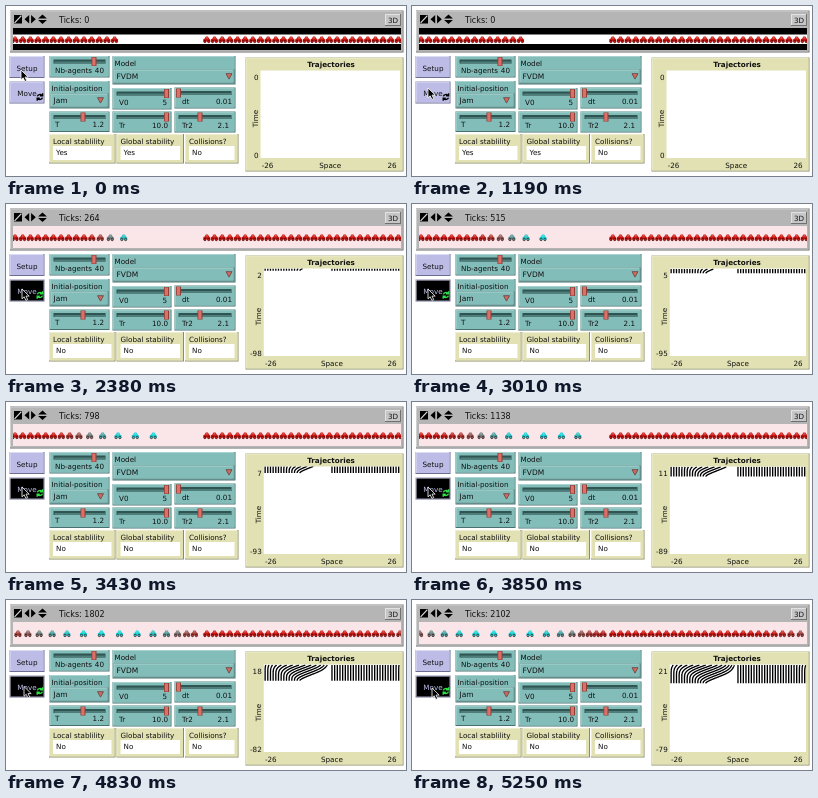
An HTML page for the animation above (5320 ms loop, 400 by 170 pixels).

```html
<!DOCTYPE html>
<html lang="en">
<head>
<meta charset="utf-8">
<title>Traffic jam model</title>
<style>
html, body { margin: 0; width: 100%; height: 100%; overflow: hidden; background: #fff; }
svg { display: block; width: 400px; height: 170px; font: 7.2px "DejaVu Sans", sans-serif; }
</style>
</head>
<body>
<svg id="stage" viewBox="0 0 400 170">
  <defs>
    <clipPath id="viewClip"><rect x="7" y="22" width="388" height="22"/></clipPath>
    <clipPath id="plotClip"><rect x="250" y="64.5" width="144" height="87.5"/></clipPath>
  </defs>
</svg>
<script>
const LOOP = 5320, STEP = 70;
const LEFT = 5, WIDTH = 391, PATCH = WIDTH / 53;
const CARS = 40, SPACING = 7.66;
const PRESS = 1680, RUN = 1750, FIRST_UPDATE = 2100;
const PLOT_RIGHT = 394;

const stage = document.getElementById('stage');

function add(tag, attrs, parent = stage) {
  const el = document.createElementNS('http://www.w3.org/2000/svg', tag);
  for (const key in attrs) el.setAttribute(key, attrs[key]);
  parent.appendChild(el);
  return el;
}
const box = (x, y, x2, y2, fill, parent) =>
  add('rect', { x, y, width: x2 - x, height: y2 - y, fill }, parent);
const path = (d, fill, attrs, parent) => add('path', { d, fill, ...attrs }, parent);
function label(x, y, text, attrs) {
  const el = add('text', { x, y, fill: '#111', ...attrs });
  el.textContent = text;
  return el;
}
const END = { 'text-anchor': 'end' }, MID = { 'text-anchor': 'middle' };

function panel(x, y, x2, y2, fill, light, dark) {
  box(x, y, x2, y2, dark);
  box(x, y, x2 - 1, y2 - 1, light);
  return box(x + 1, y + 1, x2 - 1, y2 - 1, fill);
}
const teal = (x, y, x2, y2) => panel(x, y, x2, y2, '#83bdba', '#a9d3d0', '#47706e');
const beige = (x, y, x2, y2) => panel(x, y, x2, y2, '#e1e1b3', '#eeeed2', '#8b8b68');

function slider(x, y, x2, y2, knob, name, nameX, value, valueX) {
  teal(x, y, x2, y2);
  const mid = y + 5.5;
  box(x + 4, mid - 2, x2 - 4, mid + 2, '#2f5553');
  box(x + 5, mid, x2 - 4, mid + 2, '#4f7d7a');
  box(knob - 2.5, mid - 4.5, knob + 2.5, mid + 4.5, '#8f3f38');
  box(knob - 1.7, mid - 4, knob + 1.5, mid + 4, '#dc7068');
  label(nameX, y2 - 4.6, name);
  label(valueX, y2 - 4.6, value, END);
}

function chooser(x, y, x2, y2, name, value, arrowX) {
  teal(x, y, x2, y2);
  label(x + 2, y + 9.6, name);
  teal(x + 1, y2 - 15, x2 - 1, y2 - 1);
  label(x + 4, y2 - 5.3, value, { 'font-size': 7.5 });
  path(`M${arrowX - 3} ${y2 - 10.8}h6l-3 5.4z`, '#d4685e', { stroke: '#6b4a48', 'stroke-width': .9 });
}

function monitor(x, x2, name, value) {
  beige(x, 128, x2, 157.5);
  label(x + 4, 137.6, name);
  box(x + 4, 140, x2 - 4, 154, '#fff');
  return label(x + 7, 149.3, value);
}

// World view
panel(4, 4.5, 397.5, 46.5, '#b5b5b5', '#d0d0d0', '#6a6a6a');
box(8, 9, 16, 17.5, '#000');
path('M8.6 16.8L15.4 9.6', 'none', { stroke: '#ddd', 'stroke-width': 1.2 });
path('M18.5 13.2l4.7-4.2v8.4zM29.8 13.2l-4.7-4.2v8.4zM36.5 8.5l4.4 4h-8.8zM36.5 18l4.4-4h-8.8z', '#000');
const ticksText = label(53, 16.5, 'Ticks: 0', { 'font-size': 8 });
panel(379, 8, 395, 20, '#c6c6c6', '#e2e2e2', '#707070');
label(387, 17, '3D', MID);
const field = box(7, 22, 395, 44, '#000');
const road = box(7, 28.5, 395, 38, '#fff');

const traffic = add('g', { 'clip-path': 'url(#viewClip)' });
const cars = Array.from({ length: CARS }, () => {
  const g = add('g', {}, traffic);
  path('M-3.5 1.8V-.2l1.4-.8L-1-3h2.1l1.2 2 1.2.9v1.9z', 'currentColor', {}, g);
  path('M-.7-2.2h1.5l.6 1.1h-2.6z', '#fff', { opacity: .35 }, g);
  for (const cx of [-1.9, 1.9]) {
    add('circle', { cx, cy: 2, r: 1.2, fill: 'currentColor', stroke: '#300', 'stroke-width': .6 }, g);
  }
  return g;
});

// Controls
const LILAC = '#bcbce6';
function button(y, text) {
  const face = panel(3.5, y, 38.5, y + 22, LILAC, '#dcdcf4', '#6d6d92');
  return { face, text: label(21, y + 14.7, text, MID) };
}
button(50, 'Setup');
const move = button(75.5, 'Move');
const cycle = path('M31.4 90.4a2.6 2.4 0 0 1 4.4-1.2M36.6 87.2v2.6h-2.6M36.4 91.6a2.6 2.4 0 0 1-4.4 1.2M31.2 94.8v-2.6h2.6',
  'none', { 'stroke-width': 1.4 });

slider(43.5, 50, 103.5, 71.5, 88, 'Nb-agents', 49, '40', 98);
chooser(106.5, 50, 229.5, 78.5, 'Model', 'FVDM', 223);
chooser(43.5, 75, 103.5, 102.5, 'Initial-position', 'Jam', 94.5);
slider(106.5, 82, 165.5, 103.5, 160.5, 'V0', 113, '5', 161);
slider(168.5, 81.5, 229.5, 102.5, 172.5, 'dt', 176, '0.01', 226);
slider(43.5, 105.5, 103.5, 126, 77, 'T', 49, '1.2', 98);
slider(106.5, 105.5, 165.5, 126.5, 160.5, 'Tr', 113, '10.0', 162);
slider(168.5, 105.5, 229.5, 126.5, 194, 'Tr2', 176, '2.1', 223);

const localText = monitor(43, 109.5, 'Local stablility', 'Yes');
const globalText = monitor(110.5, 178, 'Global stability', 'Yes');
monitor(179, 232.5, 'Collisions?', 'No');

// Plot: the label column on the left is as wide as its widest text
beige(239.5, 51.5, 397.5, 165.5);
label(325, 61.3, 'Trajectories', { ...MID, 'font-weight': 'bold' });
const plot = box(254, 64.5, PLOT_RIGHT, 152, '#fff');
const topText = label(0, 74, '0', END);
const bottomText = label(0, 152, '0', END);
const timeText = label(0, 0, 'Time', MID);
const minText = label(0, 161.8, '-26', MID);
const spaceText = label(0, 161.8, 'Space', MID);
label(386, 161.8, '26', MID);
const traces = path('', 'none', { stroke: '#000', 'stroke-width': 1.35, 'clip-path': 'url(#plotClip)' });

function layoutPlot(top, bottom) {
  topText.textContent = top;
  bottomText.textContent = bottom;
  const edge = 244 + Math.max(8.5, bottomText.getComputedTextLength());
  const left = edge + 2;
  topText.setAttribute('x', edge);
  bottomText.setAttribute('x', edge);
  timeText.setAttribute('transform', `translate(${edge - .8} 112.5) rotate(-90)`);
  plot.setAttribute('x', left);
  plot.setAttribute('width', PLOT_RIGHT - left);
  minText.setAttribute('x', left + 7);
  spaceText.setAttribute('x', (left + PLOT_RIGHT) / 2);
  return left;
}

const cursor = path('M0 0V9.8L2.2 7.8L3.9 11.4L5.7 10.6L4 7.1H7.2Z', '#000', { stroke: '#fff', 'stroke-width': .8 });

// Full velocity difference model, one state kept every 10 ticks
function simulate(last) {
  const v0 = 5, headTime = 1.2, tr = 10, tr2 = 2.1, dt = .01;
  const rest = SPACING / PATCH;
  // Ordered from the rear of the right group to the front of the left one
  let x = Array.from({ length: CARS }, (_, i) => (200.8 + i * SPACING - LEFT) / PATCH);
  let v = x.map(() => 0);
  const states = [];
  for (let tick = 0; tick <= last; tick++) {
    if (tick % 10 === 0) states.push({ x: x.slice(), v: v.slice() });
    const accel = x.map((pos, i) => {
      const n = (i + 1) % CARS;
      const gap = x[n] + (n ? 0 : 53) - pos - rest;
      const wish = Math.max(0, Math.min(v0, gap / headTime));
      return (wish - v[i]) / tr + (v[n] - v[i]) / tr2;
    });
    v = v.map((s, i) => Math.max(0, s + accel[i] * dt));
    x = x.map((pos, i) => pos + v[i] * dt);
  }
  return states;
}
const states = simulate(2400);

function lerpTable(table, t) {
  if (t <= table[0][0]) return table[0].slice(1);
  for (let i = 1; i < table.length; i++) {
    const a = table[i - 1], b = table[i];
    if (t <= b[0]) {
      const k = (t - a[0]) / (b[0] - a[0]);
      return a.slice(1).map((n, j) => n + (b[j + 1] - n) * k);
    }
  }
  return table[table.length - 1].slice(1);
}
// Time, tick counter, model tick seen on the road (the two refresh apart)
const TICKS = [
  [RUN, 0, 0], [1820, 40, 75], [3010, 515, 515], [3080, 515, 515],
  [3850, 1138, 1090], [4410, 1502, 1570], [5250, 2102, 2245],
];
const POINTER = [[350, 15, 64], [980, 16, 82], [1190, 16, 82], [PRESS, 16, 85], [4410, 16, 85], [5250, 20, 88]];
const SPEED_COLORS = [[0, 204, 22, 18], [.38, 112, 128, 126], [.8, 25, 212, 216]];

const wrap = x => (x % 53 + 53) % 53;

function traceData(ticks, left) {
  const top = Math.floor(ticks / 100), count = Math.floor(ticks / 10);
  let d = '';
  for (let i = 0; i < CARS; i++) {
    let before = Infinity;
    for (let k = 0; k <= count; k += 2) {
      const x = wrap(states[k].x[i]);
      const y = 65 + (top - k / 10) * .87;
      d += (Math.abs(x - before) < 5 ? 'L' : 'M') + (left + x / 53 * (PLOT_RIGHT - left)).toFixed(2) + ' ' + y.toFixed(2);
      before = x;
    }
  }
  return d;
}

function draw(t) {
  const [ticks, seen] = lerpTable(TICKS, t).map(Math.round);
  const pressed = t >= PRESS, running = t >= RUN, updated = t >= FIRST_UPDATE;

  field.setAttribute('fill', running ? '#fae5e8' : '#000');
  road.setAttribute('visibility', running ? 'hidden' : 'visible');
  move.face.setAttribute('fill', pressed ? '#000' : LILAC);
  move.text.setAttribute('fill', pressed ? LILAC : '#111');
  cycle.setAttribute('stroke', pressed ? '#2fe044' : '#000');

  const shown = updated ? ticks : 0, top = Math.floor(shown / 100);
  ticksText.textContent = 'Ticks: ' + shown;
  localText.textContent = globalText.textContent = updated ? 'No' : 'Yes';
  const left = layoutPlot(top, running ? top - 100 : 0);
  traces.setAttribute('d', updated ? traceData(ticks, left) : '');

  const k = Math.floor(seen / 10), mix = seen / 10 - k;
  const now = states[k], next = states[k + 1];
  cars.forEach((car, i) => {
    const x = LEFT + wrap(now.x[i] + (next.x[i] - now.x[i]) * mix) * PATCH;
    const rgb = lerpTable(SPEED_COLORS, now.v[i]).map(Math.round);
    car.setAttribute('transform', `translate(${x.toFixed(2)} 33.5)`);
    car.setAttribute('color', `rgb(${rgb})`);
  });
  cursor.setAttribute('transform', `translate(${lerpTable(POINTER, t)})`);
}

let drawn = -1;
const start = performance.now();
function frame() {
  let t = Math.floor((performance.now() - start) % LOOP / STEP) * STEP;
  if (t !== drawn) draw(drawn = t);
  requestAnimationFrame(frame);
}
frame();
</script>
</body>
</html>
```
